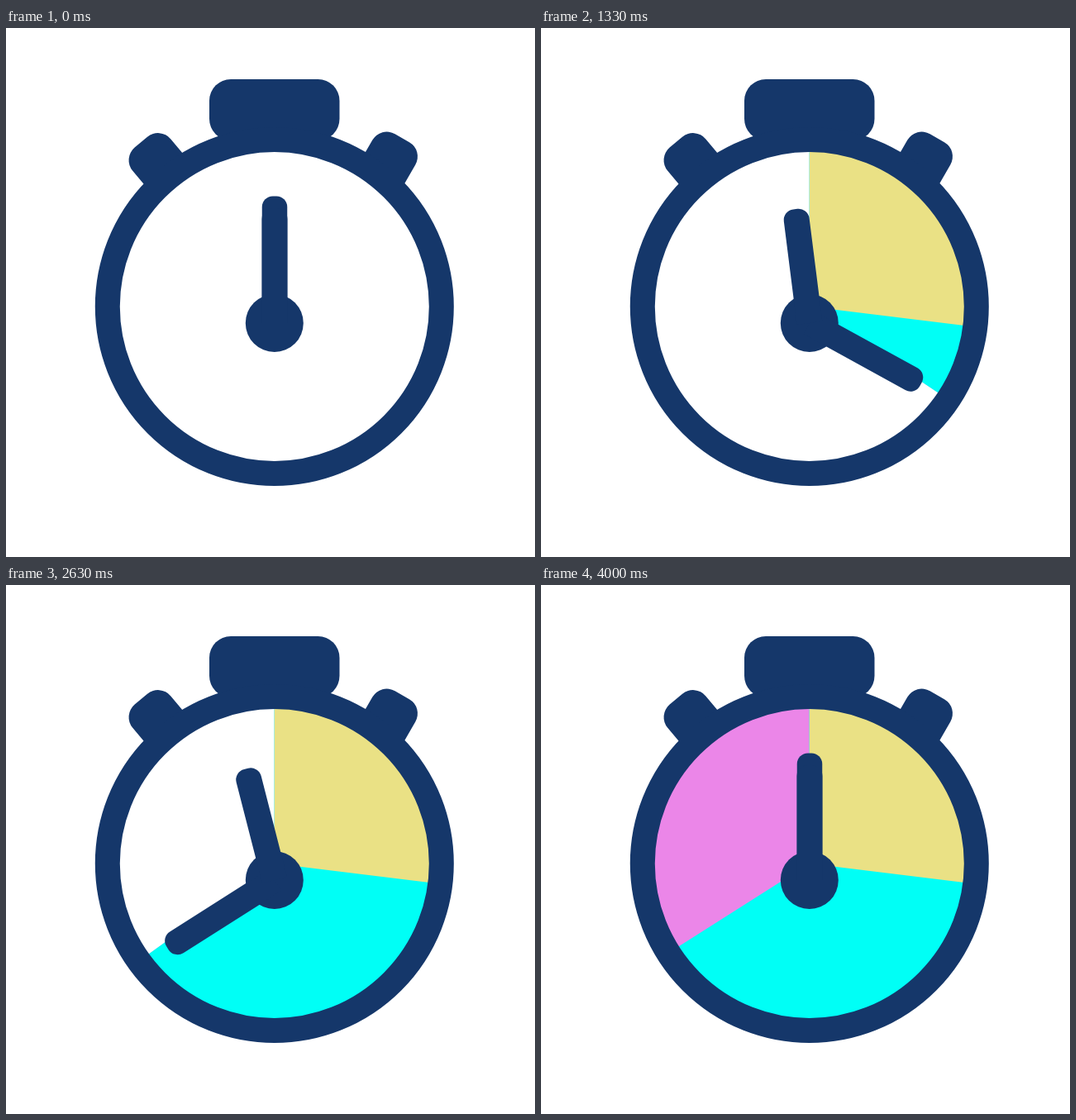
An HTML page with a canvas that plays this animation: 640 by 640 pixels, repeating every 4.03 s.

```html
<!DOCTYPE html>
<html lang="en">
<head>
<meta charset="utf-8">
<title>Stopwatch</title>
<style>
  html, body { margin: 0; height: 100%; overflow: hidden; background: #fff; }
  canvas { display: block; }
</style>
</head>
<body>
<canvas width="640" height="640"></canvas>
<script>
const ctx = document.querySelector('canvas').getContext('2d');
const NAVY = '#15376a';
const CX = 324.8, CY = 337, HUB_Y = 357;
const LOOP = 4030;
const RAD = Math.PI / 180;

// Sweep of the pie: [step, degrees]
const STOPS = [[0, 0], [25, 97], [67, 237.6], [100, 360]];
const SLICES = [['#eb86e8', 360, 0], ['#00fff6', 237.6, -0.2], ['#eae185', 97, 0]];

// 25 steps per second, shown at 30 pictures per second
function stepAt(ms) {
  const tick = Math.floor((ms + 3.4) * 0.03);
  return Math.min(100, Math.ceil(tick * 5 / 6 - 0.5));
}

function sweepAt(step) {
  const i = STOPS.findIndex(([s]) => step <= s);
  if (i < 1) return 0;
  const [s0, a0] = STOPS[i - 1], [s1, a1] = STOPS[i];
  return a0 + (a1 - a0) * (step - s0) / (s1 - s0);
}

function box(x, y, deg, left, top, w, h, r) {
  ctx.save();
  ctx.translate(x, y);
  ctx.rotate(deg * RAD);
  ctx.beginPath();
  ctx.roundRect(left, top, w, h, r);
  ctx.fill();
  ctx.restore();
}

function disc(x, y, r, color) {
  ctx.fillStyle = color;
  ctx.beginPath();
  ctx.arc(x, y, r, 0, 2 * Math.PI);
  ctx.fill();
}

function slice(color, deg, dx) {
  ctx.fillStyle = color;
  ctx.beginPath();
  ctx.moveTo(CX + dx, CY);
  ctx.arc(CX + dx, CY, 195, -90 * RAD, (deg - 90) * RAD);
  ctx.fill();
}

function hand(deg, length, width) {
  box(CX + 0.2, HUB_Y, deg, -width / 2, -length, width, length, [13, 13, 0, 0]);
}

function draw(now) {
  const step = stepAt(now % LOOP);
  const sweep = sweepAt(step);

  ctx.fillStyle = '#fff';
  ctx.fillRect(0, 0, 640, 640);

  ctx.fillStyle = NAVY;
  box(246, 62, 0, 0, 0, 157.5, 74, 26);
  box(176.2, 153.5, -40, -30, -20, 60, 70, 20);
  box(469.3, 150.5, 30, -30, -20, 60, 70, 20);

  disc(CX, CY, 202, '#fff');
  if (step) for (const [color, end, dx] of SLICES) slice(color, Math.min(sweep, end), dx);

  ctx.strokeStyle = NAVY;
  ctx.lineWidth = 30;
  ctx.beginPath();
  ctx.arc(CX, CY, 202, 0, 2 * Math.PI);
  ctx.stroke();

  disc(CX, HUB_Y, 35, NAVY);
  hand(step * 3.6, 153.5, 30.5);
  hand(step * 21.6, 139, 31);
}

const start = performance.now();
function loop() {
  draw(performance.now() - start);
  requestAnimationFrame(loop);
}
loop();
</script>
</body>
</html>
```
